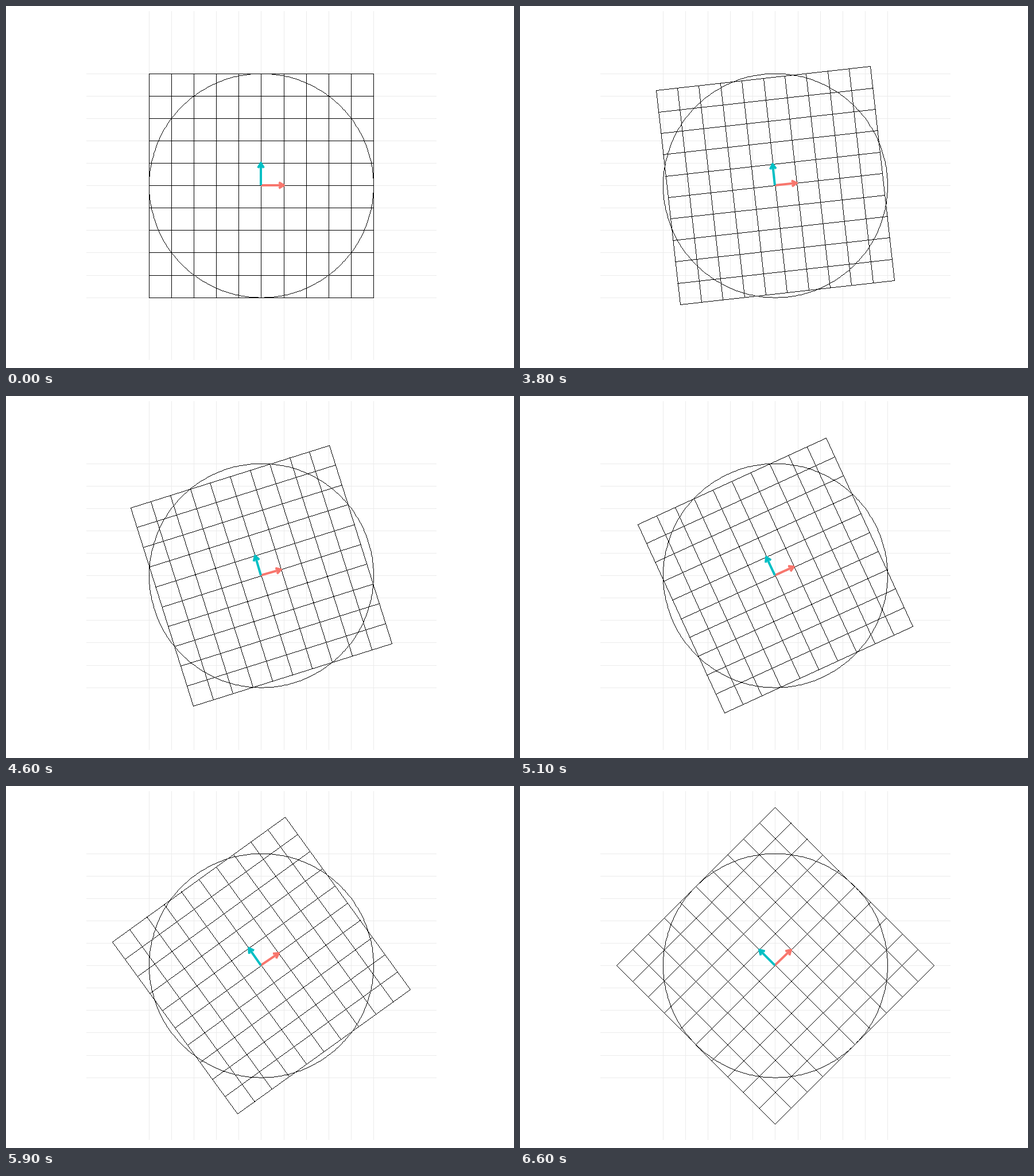
Animation of 885x632 px, one loop 10 s. Source, as a matplotlib script:

```python
import numpy as np
import matplotlib.pyplot as plt
from matplotlib.animation import FuncAnimation
from matplotlib.collections import LineCollection

WIDTH, HEIGHT, DPI = 885, 632, 64
PX = 72 / DPI                     # one pixel in points
UNIT = 39.1                       # pixels per grid cell
HALF = 5                          # grid reaches from -HALF to HALF
CENTER = np.array([444.45, 313.1])
ARROW_CENTER = np.array([444.45, 313.45])
HEAD = 10                         # arrow head length in pixels

FRAMES, INTERVAL = 100, 100
HOLD, STEPS = 33, 33              # resting frames, then moving steps

GREY, BLACK = 0xEB, 0

plt.rcParams["path.snap"] = False
plt.rcParams["toolbar"] = "None"


def to_pixels(points, center=CENTER):
    """Map y-up grid units to whole pixel positions."""
    xy = center + np.asarray(points) * [UNIT, -UNIT]
    return np.floor(xy + 0.5).astype(int)


def draw_line(canvas, start, end, shade):
    """Hard-edged line, one pixel wide."""
    count = np.abs(end - start).max() + 1
    x, y = np.floor(np.linspace(start, end, count) + 0.5).astype(int).T
    canvas[y, x] = shade


def draw_lines(canvas, segments, shade):
    for start, end in to_pixels(segments):
        draw_line(canvas, start, end, shade)


def grid_segments(reach):
    ticks = range(-HALF, HALF + 1)
    across = [[(-reach, k), (reach, k)] for k in ticks]
    upright = [[(k, -reach), (k, reach)] for k in ticks]
    return np.array(across + upright, dtype=float)


def make_background():
    canvas = np.full((HEIGHT, WIDTH), 255, dtype=np.uint8)
    draw_lines(canvas, grid_segments(HALF * np.sqrt(2) * 1.1), GREY)
    angle = np.linspace(0, 2 * np.pi, 361)
    circle = HALF * np.column_stack([np.cos(angle), np.sin(angle)])
    draw_lines(canvas, np.stack([circle[:-1], circle[1:]], axis=1), BLACK)
    return canvas


def arrow_parts(vector):
    """Shaft and open 30-degree head, in pixels."""
    tail, tip = to_pixels([(0, 0), vector], ARROW_CENTER)
    dx, dy = tail - tip
    back = np.arctan2(dy, dx)
    barbs = [tip + HEAD * np.array([np.cos(a), np.sin(a)])
             for a in (back - np.pi / 6, back + np.pi / 6)]
    return [np.array([tail, tip]), np.array([barbs[0], tip, barbs[1]])]


fig = plt.figure(figsize=(WIDTH / DPI, HEIGHT / DPI), dpi=DPI, facecolor="white")
ax = fig.add_axes([0, 0, 1, 1])
ax.axis("off")

background = make_background()
picture = ax.imshow(background, cmap="gray", vmin=0, vmax=255, aspect="auto",
                    interpolation="nearest", extent=(0, WIDTH, HEIGHT, 0))


def add_arrow(color, zorder):
    lines = LineCollection([], colors=color, linewidths=4 * PX,
                           capstyle="butt", joinstyle="round", zorder=zorder)
    ax.add_collection(lines, autolim=False)
    return lines


x_arrow = add_arrow("#F8766D", 4)
y_arrow = add_arrow("#00BFC4", 5)
ax.set_xlim(0, WIDTH)
ax.set_ylim(HEIGHT, 0)

square = grid_segments(HALF)
C = np.sqrt(0.5)
ROTATION = np.array([[C, -C], [C, C]])


def update(frame):
    t = np.clip((frame - HOLD) / STEPS, 0, 1)
    # Points travel in straight lines, so the grid shrinks slightly midway.
    matrix = (1 - t) * np.eye(2) + t * ROTATION
    canvas = background.copy()
    draw_lines(canvas, square @ matrix.T, BLACK)
    picture.set_data(canvas)
    x_arrow.set_segments(arrow_parts(matrix[:, 0]))
    y_arrow.set_segments(arrow_parts(matrix[:, 1]))
    return picture, x_arrow, y_arrow


anim = FuncAnimation(fig, update, frames=FRAMES, interval=INTERVAL,
                     repeat=True, repeat_delay=0, blit=False)
plt.show()
```
